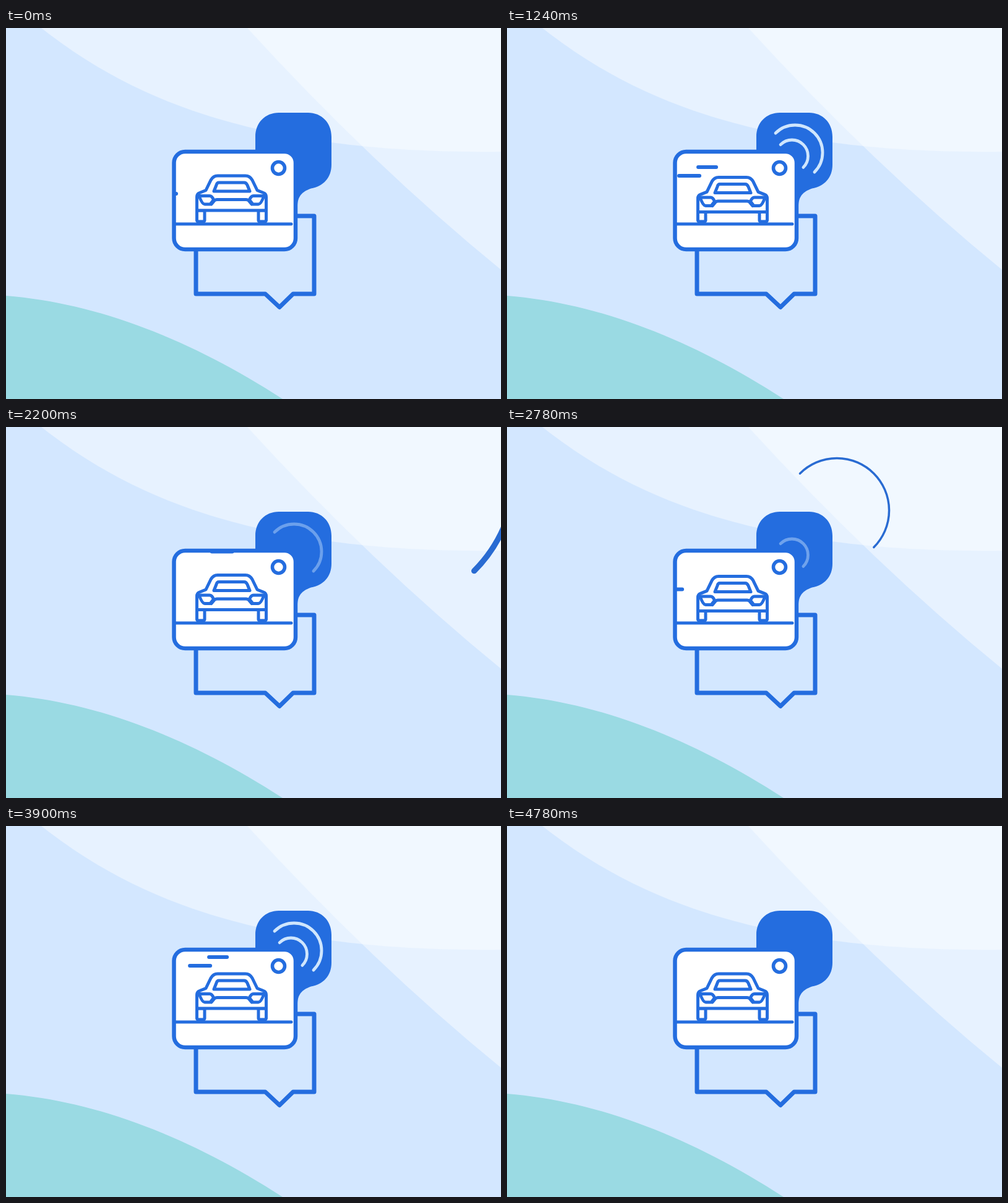
These frames come from a looping animation (800 px wide and 600 px high, 4800 ms). An HTML page with a canvas:

```html
<!DOCTYPE html>
<html lang="en">
<head>
<meta charset="utf-8">
<title>Car snapshot</title>
<style>
html, body { margin: 0; width: 100%; height: 100%; overflow: hidden; background: #d3e7ff; }
canvas { display: block; }
</style>
</head>
<body>
<canvas id="stage" width="800" height="600"></canvas>
<script>
const ctx = document.getElementById('stage').getContext('2d');
const BLUE = '#246ddf', CYCLE = 2400;
const clamp = v => Math.min(1, Math.max(0, v));
const ramp = (t, from, to) => clamp((t - from) / (to - from));
const smooth = u => u * u * (3 - 2 * u);

function fill(path, color) {
  ctx.fillStyle = color;
  ctx.fill(path);
}

function stroke(path, width, color = BLUE) {
  ctx.strokeStyle = color;
  ctx.lineWidth = width;
  ctx.stroke(path);
}

function roundRect(x, y, w, h, r) {
  const path = new Path2D();
  path.roundRect(x, y, w, h, r);
  return path;
}

const curveTop = new Path2D('M57 0C185 100 380 205 800 200V0Z');
const curveRight = new Path2D('M390 0Q593 222 800 391V0Z');
const hill = new Path2D('M0 433C150 445 300 505 447 600H0Z');
const bubble = new Path2D('M403 176C403 153 419 137 441 137H488C510 137 526 153 526 176V221C526 242 513 256 493 259.5C478 265 471 272 471 290V320H403Z');
const note = new Path2D('M470 304H498V430H464L442 451.5L419 430H307V340');
const card = roundRect(271.5, 200, 196.5, 158, 18);
const ground = new Path2D('M272 317H461');

const carBody = new Path2D('M308.5 295V273Q308.5 268 313 266.5L323 262.5L331 246Q335 239 342 239H387Q394 239 398 246L406 262.5L416 266.5Q420.5 268 420.5 273V295Z');
const windshield = new Path2D('M344 250H385Q388 250 390 254L394 264H336L340 254Q341 250 344 250Z');
const headlight = new Path2D('M312 271.5H329Q333 271.5 335.5 278L330 285H321Q317 285 312 271.5Z');
const grille = new Path2D('M332 285L337 279Q338.5 277.5 341 277.5H388Q390.5 277.5 392 279L397 285');

// Quarter-turned half circle, open towards the lower left
function wave(x, y, r, width, color) {
  const path = new Path2D();
  path.arc(x, y, r, -Math.PI * .75, Math.PI * .25);
  stroke(path, width, color);
}

function flyingWave(age) {
  const r = .42 * age;
  if (r > 0 && r < 300) wave(496 + .44 * r, 172 - .44 * r, r, .041 * r, '#296bd2');
}

function bubbleWave(x, y, r, opacity) {
  ctx.globalAlpha = opacity;
  wave(x, y, r, 4.8, '#cfe6fd');
  ctx.globalAlpha = 1;
}

function speedLine(right, y, length) {
  const path = new Path2D();
  path.moveTo(right - length + 3, y);
  path.lineTo(right - 3, y);
  stroke(path, 6);
}

function car(t) {
  const phase = t % 800 / 800;
  const drop = 2.6 * clamp(.5 + 1.2 * Math.cos(2 * Math.PI * (phase - .46)));
  for (const x of [308.5, 408]) {
    stroke(roundRect(x, 295 + drop, 12.5, 18 - drop, 2), 5);
  }
  ctx.save();
  ctx.translate(0, drop);
  fill(carBody, '#fff');
  for (const part of [carBody, windshield, headlight, grille]) stroke(part, 5);
  ctx.translate(729, 0);
  ctx.scale(-1, 1);
  stroke(headlight, 5);
  ctx.restore();
}

function background() {
  ctx.fillStyle = '#d3e7ff';
  ctx.fillRect(0, 0, 800, 600);
  fill(curveTop, '#e7f2ff');
  fill(curveRight, '#e7f2ff');
  ctx.save();
  ctx.clip(curveTop);
  fill(curveRight, '#f1f8ff');
  ctx.restore();
  fill(hill, '#9adae3');
}

function draw(now) {
  const t = now % CYCLE;
  ctx.lineCap = ctx.lineJoin = 'round';
  background();
  flyingWave(t - 180);
  flyingWave(t - 1660);
  stroke(note, 7);
  fill(bubble, BLUE);
  bubbleWave(460.5, 207, 26, ramp(t, 260, 535) - ramp(t, 1700, 1980));
  bubbleWave(465.5, 201.5, 44.5, ramp(t, 720, 1000) - ramp(t, 2050, 2310));

  fill(card, '#fff');
  const p = smooth(t / CYCLE), right = 278 + 120 * p, y = 268 - 82 * p;
  ctx.save();
  ctx.clip(card);
  speedLine(right, y, 35);
  speedLine(right - 27, y + 14, 39);
  ctx.restore();
  stroke(card, 6.5);
  stroke(ground, 5);
  car(t);

  const lens = new Path2D();
  lens.arc(440.5, 226.5, 10, 0, 2 * Math.PI);
  stroke(lens, 5.6);
}

function loop() {
  draw(performance.now());
  requestAnimationFrame(loop);
}
loop();
</script>
</body>
</html>
```
